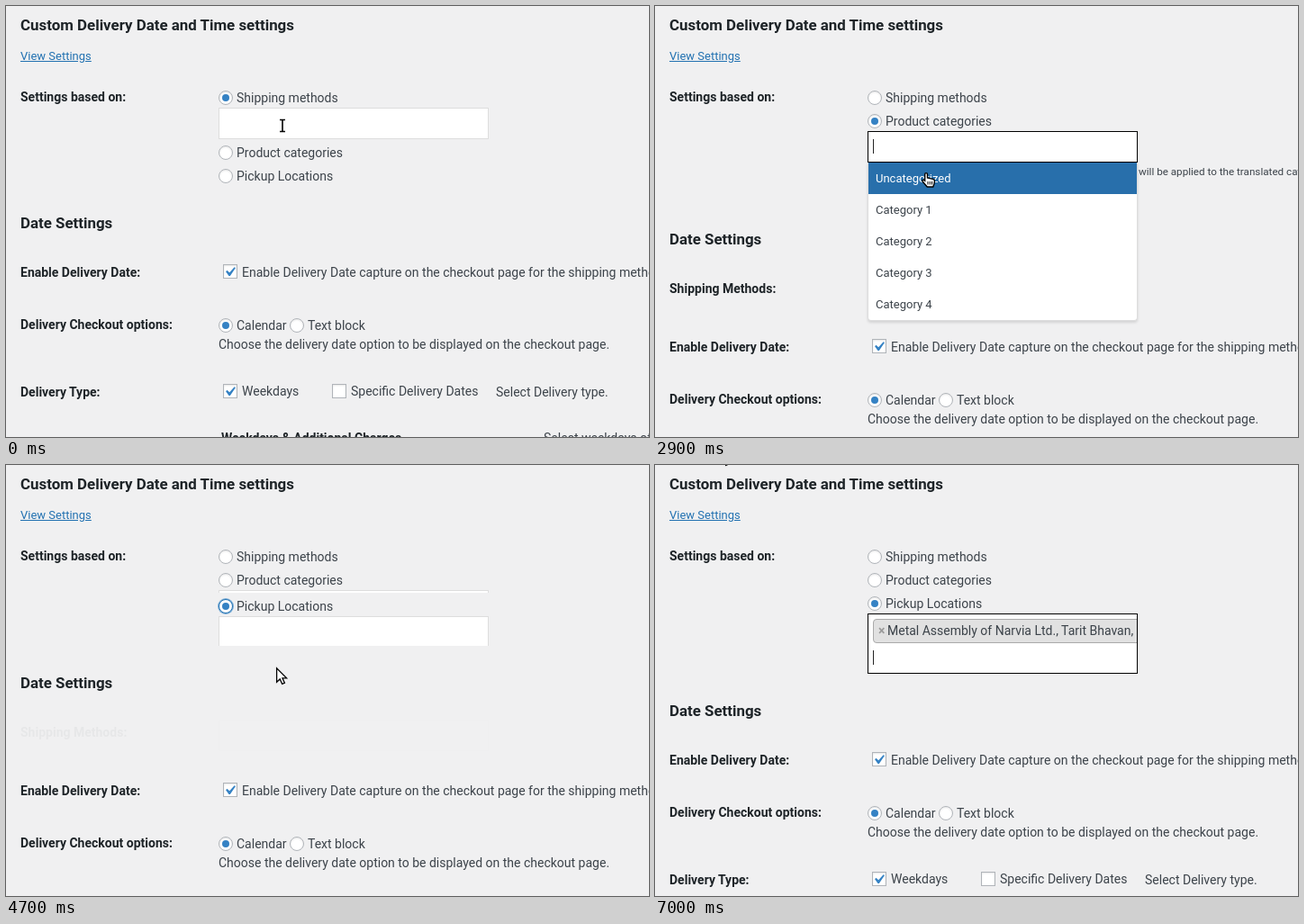
Recreate the animation shown at these times as an HTML page. Size 714 by 479 pixels, loop 7.1 s.

```html
<!DOCTYPE html>
<html lang="en">
<head>
<meta charset="utf-8">
<title>Delivery settings</title>
<style>
html, body { margin: 0; width: 100%; height: 100%; overflow: hidden; background: #f0f0f1; }
#stage { position: absolute; left: 0; top: 0; width: 714px; height: 479px; overflow: hidden;
  font: 14px/20px Roboto, sans-serif; color: #3c434a; }
#stage div, #stage svg { position: absolute; box-sizing: border-box; white-space: nowrap; }
#stage .bold { font-weight: 600; color: #1d2327; }
#stage .head { font-size: 16.9px; }
#stage .link { font-size: 13px; color: #2271b1; text-decoration: underline; }
#stage .hover { color: #135e96; }
#stage .note { font-size: 11.67px; }
.radio, .check { width: 16px; height: 16px; background: #fff; border: 1px solid #b0b4b9;
  box-shadow: inset 0 1px 2px rgba(0,0,0,.1); }
.radio { border-radius: 50%; }
.radio.on::before { content: ""; position: absolute; left: 3px; top: 3px; width: 8px; height: 8px;
  border-radius: 50%; background: #3582c4; }
.radio.ring { border-color: #2271b1; box-shadow: 0 0 0 1px #7fb0d8; }
.slide { left: 236px; width: 478px; overflow: hidden; }
.box { left: 0; top: 0; width: 300px; background: #fff; border: 1px solid #ddd; overflow: hidden; }
.box.focus { border-color: #000; }
.chip { left: 5px; top: 5px; height: 27px; line-height: 25px; padding: 0 6px 0 5px; background: #e1e1e1;
  border: 1px solid #aaa; border-radius: 4px; }
.chip b { display: inline-block; width: 10px; color: #999; }
.caret { left: 5px; width: 1px; height: 16px; background: #222; }
.menu { left: 236px; width: 300px; background: #fff; border: 1px solid #ddd; border-top: 0;
  border-radius: 0 0 4px 4px; box-shadow: 0 2px 3px rgba(0,0,0,.12); overflow: hidden; }
.option { left: 0; width: 298px; padding: 8px; font-size: 13px; line-height: 19px; }
.option.lit { background: #286fab; color: #fff; }
</style>
</head>
<body>
<div id="stage"></div>
<script>
const LOOP = 7100, STEP = 100, BOX = 35, CHIP = 32;
const stage = document.getElementById('stage');

// One entry per radio choice: shown while from <= t < to
const choices = [
  { label: 'Shipping methods', from: 0, to: 2000, open: 500, press: 1000, pick: 0, note: 0,
    options: [['West Zone -> Flat rate'], ['West Zone -> Free shipping'], ['East Zone -> Flat rate']] },
  { label: 'Product categories', from: 2000, to: 4400, open: 2900, press: 3800, pick: 1, note: 18,
    options: [['Uncategorized'], ['Category 1'], ['Category 2'], ['Category 3'], ['Category 4']] },
  { label: 'Pickup Locations', from: 4400, to: LOOP, open: 5200, press: 5700, pick: 0, note: 0,
    options: [['Metal Assembly of Narvia Ltd., Tarit Bhavan, Sohri', 'Road, Delhi, 119903, India'],
              ['270, Varuni Apartments, Nolak Pura, Delhi,', '119934, India']] }
];

// Pointer path: time, x, y, shape
const path = [
  [0, 307, 133, 'beam'], [500, 307, 133, 'beam'], [700, 302, 151, 'hand'], [900, 295, 166, 'hand'],
  [1100, 294, 170, 'beam'], [1200, 294, 173, 'beam'], [1500, 294, 174, 'beam'], [1600, 293, 182, 'arrow'],
  [1900, 290, 189, 'arrow'], [2100, 290, 189, 'arrow'], [2300, 302, 158, 'beam'], [2800, 302, 158, 'beam'],
  [2900, 301, 185, 'hand'], [3300, 298, 214, 'hand'], [3400, 298, 214, 'hand'], [3800, 295, 226, 'hand'],
  [3900, 295, 226, 'arrow'], [4200, 300, 234, 'arrow'], [4400, 300, 234, 'arrow'], [4700, 300, 225, 'arrow'],
  [4900, 305, 196, 'arrow'], [5000, 307, 182, 'beam'], [5200, 307, 182, 'beam'], [5300, 306, 211, 'hand'],
  [5500, 305, 216, 'hand'], [5700, 305, 216, 'hand'], [5800, 305, 216, 'beam'], [5900, 262, 178, 'arrow'],
  [6300, 80, 12, 'arrow'], [6400, 70, 46, 'hand'], [6500, 72, 36, 'arrow'], [6800, 72, -18, 'arrow'],
  [LOOP, 72, -18, 'arrow']
];

// Shapes with the hot spot at 0,0
const shapes = {
  beam: '<path d="M-3-6.5h2.5L0-6 .5-6.5H3M0-6V6M-3 6.5h2.5L0 6 .5 6.5H3" fill="none" stroke="#fff" stroke-width="3.4"/>' +
        '<path d="M-3-6.5h2.5L0-6 .5-6.5H3M0-6V6M-3 6.5h2.5L0 6 .5 6.5H3" fill="none" stroke="#000" stroke-width="1.6"/>',
  arrow: '<path d="M.6.8V16.2L4.2 12.9 6.7 18.4 9.4 17.2 7 11.9H11.6Z" fill="#fff" stroke="#000" stroke-width="1.3"/>',
  hand: '<path d="M0 .6C1 .6 1.5 1.2 1.5 2V6L7.6 7.4C9 7.7 9.6 8.5 9.4 9.8L8.8 13 7.8 16H1.3L-3.9 10C-4.5 8.8-3.4 7.8-2.3 8.4L-1.3 9.2V2C-1.3 1.2-.8.6 0 .6Z" ' +
        'fill="#fff" stroke="#000" stroke-width="1.4"/><path d="M2 10v3.5M4.3 10v3.5M6.5 10v3.5" stroke="#000"/>'
};

const within = (t, a, b) => t >= a && t < b;
const swing = x => 0.5 - Math.cos(Math.PI * Math.min(1, Math.max(0, x))) / 2;
const div = (cls, style, inner = '') => `<div class="${cls}" style="${style}">${inner}</div>`;
const text = (x, mid, str, cls = '') => div(cls, `left:${x}px;top:${mid - 10}px`, str);
const label = (mid, str) => text(16, mid, str, 'bold');
const radio = (x, mid, str, cls = '') =>
  div('radio ' + cls, `left:${x}px;top:${mid - 8}px`) + text(x + 20, mid, str);

function check(x, top, on) {
  const tick = '<svg style="left:-4px;top:-3px" width="21" height="21" viewBox="0 0 20 20">' +
    '<path fill="#3582c4" d="M14.83 4.89l1.34.94-5.81 8.38H9.02L5.78 9.67l1.34-1.25 2.57 2.4z"/></svg>';
  return div('check', `left:${x}px;top:${top}px`, on ? tick : '');
}

function pointer(t) {
  let i = path.length - 1;
  while (path[i][0] > t) i--;
  const [t0, x0, y0, shape] = path[i], [t1, x1, y1] = path[i + 1];
  const k = (t - t0) / (t1 - t0);
  return { x: Math.round(x0 + (x1 - x0) * k), y: Math.round(y0 + (y1 - y0) * k), shape };
}

function selectBox(c, t, top, height) {
  const done = c.press + STEP, chosen = t >= done;
  const boxHeight = BOX + (chosen ? CHIP : 0);
  const focus = within(t, c.open, c.press) || within(t, done, c.to);
  const since = chosen ? done : c.open;
  let inner = '';
  if (chosen) inner += div('chip', '', '<b>×</b>' + c.options[c.pick].join(' '));
  if (focus && (t - since) % 1200 < 600) inner += div('caret', `top:${boxHeight - 27}px`);
  let html = div('box' + (focus ? ' focus' : ''), `height:${boxHeight}px`, inner);
  if (c.note) {
    html += div('note', `right:177px;top:${boxHeight}px`, 'The delivery settings of the default language categories&nbsp;') +
      div('note', `left:301px;top:${boxHeight}px`, 'will be applied to the translated categories.');
  }
  return div('slide', `top:${top}px;height:${height}px`, html);
}

function dropdown(c, top, y) {
  let html = '', offset = 0, lit = 0;
  const tops = c.options.map((lines, i) => {
    const start = offset;
    offset += 16 + 19 * lines.length;
    if (within(y, top + start, top + offset)) lit = i;
    return start;
  });
  c.options.forEach((lines, i) => {
    html += div('option' + (i === lit ? ' lit' : ''), `top:${tops[i]}px`, lines.join('<br>'));
  });
  return div('menu', `top:${top}px;height:${offset + 1}px`, html);
}

function draw(t) {
  const first = swing((t - 2000) / 400), second = swing((t - 4350) / 400);
  const share = [1 - first, first * (1 - second), second];
  const p = pointer(t);
  const hover = within(p.x, 16, 95) && within(p.y, 46, 64);
  let html = text(16, 21, 'Custom Delivery Date and Time settings', 'bold head') +
    text(16, 56, 'View Settings', 'link' + (hover ? ' hover' : '')) +
    label(101, 'Settings based on:');
  let shift = 0, menu = '';

  choices.forEach((c, i) => {
    const full = BOX + c.note + (t >= c.press + STEP ? CHIP : 0);
    const mid = Math.floor(102 + 26 * i + shift), height = full * share[i];
    const on = within(t, c.from, c.to), ring = i && within(t, c.from, c.open);
    html += radio(236, mid, c.label, (on ? 'on ' : '') + (ring ? 'ring' : ''));
    if (height > 0) html += selectBox(c, t, mid + 11, Math.floor(height));
    if (within(t, c.open, c.press + STEP)) menu = dropdown(c, mid + 11 + BOX, p.y);
    shift += height;
  });

  let y = Math.floor(206 + shift);
  html += text(16, y, 'Date Settings', 'bold head');
  if (t >= 2000 && second < 1) {
    html += div('', `left:0;top:${y}px;opacity:${share[1]}`, label(55, 'Shipping Methods:') +
      div('box', `left:236px;top:41px;height:${BOX}px`));
    y += 65;
  }
  html += label(y + 55, 'Enable Delivery Date:') + check(241, y + 46, true) +
    text(262, y + 55, 'Enable Delivery Date capture on the checkout page for the shipping method.') +
    label(y + 113, 'Delivery Checkout options:') +
    radio(236, y + 114, 'Calendar', 'on') + radio(315, y + 114, 'Text block') +
    text(236, y + 135, 'Choose the delivery date option to be displayed on the checkout page.') +
    label(y + 188, 'Delivery Type:') +
    check(241, y + 179, true) + text(262, y + 187, 'Weekdays') +
    check(362, y + 179, false) + text(383, y + 187, 'Specific Delivery Dates') +
    text(544, y + 188, 'Select Delivery type.') +
    text(239, y + 239, 'Weekdays &amp; Additional Charges', 'bold') +
    text(597, y + 239, 'Select weekdays of delivery.');

  stage.innerHTML = html + menu +
    `<svg width="714" height="479" style="left:0;top:0"><g transform="translate(${p.x} ${p.y})">${shapes[p.shape]}</g></svg>`;
}

let last = -1;
const begin = performance.now();
function frame() {
  const t = Math.floor((performance.now() - begin) % LOOP / STEP) * STEP;
  if (t !== last) draw(last = t);
  requestAnimationFrame(frame);
}
frame();
</script>
</body>
</html>
```
